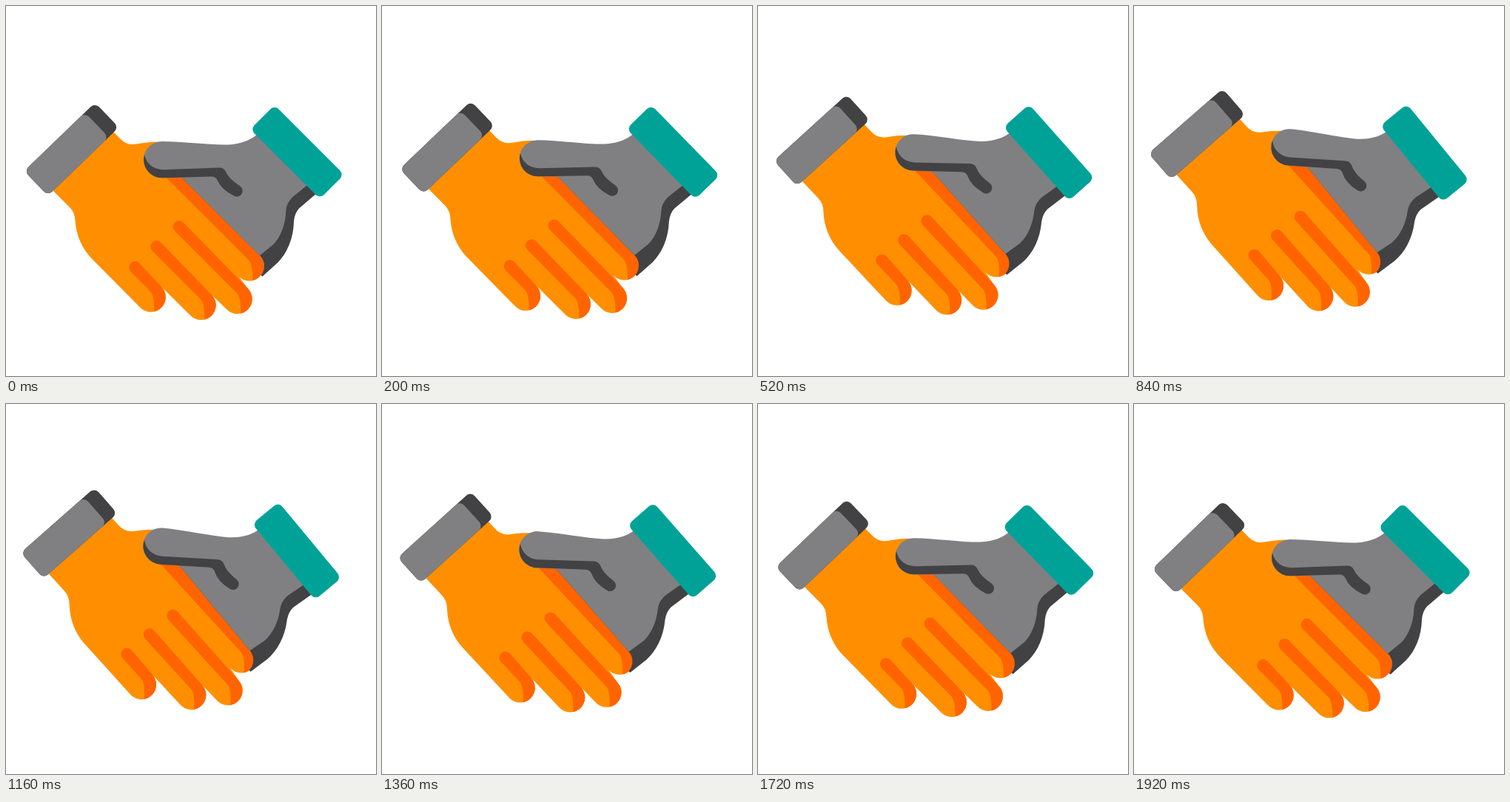
Recreate the animation shown at these times as an HTML page with a canvas. Size 500 by 500 pixels, loop 1960 ms.

```html
<!DOCTYPE html>
<html lang="en">
<head>
<meta charset="utf-8">
<title>Handshake</title>
<style>
  html, body { margin: 0; width: 100%; height: 100%; overflow: hidden; background: #fff; }
  canvas { display: block; width: 100vw; height: 100vh; object-fit: contain; }
</style>
</head>
<body>
<canvas id="stage" width="500" height="500"></canvas>
<script>
const ctx = document.getElementById('stage').getContext('2d');

const ORANGE = '#ff8f00', EMBER = '#ff6400';
const GRAY = '#808082', DARK = '#424143', TEAL = '#00a298';
const STEP = 40, FRAMES = 49, HALF = 24;
const R = 20, D = R * Math.SQRT1_2, Q = Math.PI / 4;

// Fingertip centres and the x where each shaded groove begins
const fingers = [
  { x: 195.8, y: 393.5, groove: 174.4 },
  { x: 263.7, y: 404.3, groove: 203.5 },
  { x: 312.7, y: 396, groove: 233.8 },
  { x: 328.8, y: 351.4, groove: 212 }
];

function makePalm() {
  const p = new Path2D('M135 160 L100 200 L64 250 L86 272 Q93 279 93.5 290 C95 312 104 329 116 341.5');
  for (const f of fingers) p.arc(f.x, f.y, R, 3 * Q, -Q, true);
  p.lineTo(215, 209.3);
  p.lineTo(205, 183.5);
  p.quadraticCurveTo(190, 184, 178, 186.3);
  p.quadraticCurveTo(164, 189.5, 155, 180);
  p.closePath();
  return p;
}

function makeGroove({ x, y, groove }) {
  const p = new Path2D();
  p.arc(groove, groove - x + y - 18.8, 8.2, -Q, 3 * Q, true);
  p.lineTo(x - 1, y - 8.2);
  p.quadraticCurveTo(x + 5, y - 2.2, x + 4.5, y + 19.5);
  p.arc(x, y, R, 1.344, -Q, true);
  p.closePath();
  return p;
}

function makeBody() {
  const f = fingers[3];
  const p = new Path2D();
  p.moveTo(228, 228 - f.x + f.y - 2 * D);
  p.arc(f.x, f.y, R, -Q, 0.66);
  p.lineTo(346.5, 365.5);
  p.lineTo(367.5, 346.5);
  p.bezierCurveTo(379.5, 334, 388.5, 315, 389, 291);
  p.quadraticCurveTo(390, 280, 396, 273.5);
  p.lineTo(420, 253);
  p.lineTo(390, 200);
  p.closePath();
  return p;
}

const palm = makePalm();
const grooves = fingers.map(makeGroove);
const underlap = new Path2D('M215 209.3 L232 212 L250 235 L278 272.3 Z');
const body = makeBody();
const lightBody = new Path2D('M343 170 Q328 186 300 187.5 C275 188 240 183.1 210.5 183.1 ' +
  'A24.6 24.6 0 0 0 210.5 232.3 L238 232.3 L342.94 337.26 L361.5 322 ' +
  'C372 311.5 378 293 378.3 277 Q379 266 387.5 258 L409 240.5 L390 200 Z');
const crease = new Path2D('M187 201 C190 214 200 221.2 213 221.2 L287 218.5 Q294 218 296.8 223.5 ' +
  'Q301 233.5 315.8 243 A7.6 7.6 0 0 1 308 256.5 Q291 248 286 236 Q283.5 230 277 230.4 ' +
  'L212 232.3 A24.6 24.6 0 0 1 187 201 Z');

function fill(color, path) {
  ctx.fillStyle = color;
  ctx.fill(path);
}

function cuff(cx, cy, deg, parts) {
  ctx.save();
  ctx.translate(cx, cy);
  ctx.rotate(deg * Math.PI / 180);
  for (const [color, length] of parts) {
    const p = new Path2D();
    p.roundRect(-66.5, -23.2, length, 46.4, 8);
    fill(color, p);
  }
  ctx.restore();
}

function turned(px, py, deg, paint) {
  ctx.save();
  ctx.translate(px, py);
  ctx.rotate(deg * Math.PI / 180);
  ctx.translate(-px, -py);
  paint();
  ctx.restore();
}

function leftHand() {
  fill(ORANGE, palm);
  fill(EMBER, underlap);
  for (const g of grooves) fill(EMBER, g);
  cuff(88.5, 193.5, -44, [[DARK, 133], [GRAY, 114]]);
}

function rightHand() {
  fill(DARK, body);
  fill(GRAY, lightBody);
  fill(DARK, crease);
  cuff(393.5, 197.2, 45, [[TEAL, 133]]);
}

function draw(time) {
  const frame = Math.floor(time / STEP) % FRAMES;
  const t = 1 - Math.abs(frame - HALF) / HALF;
  const lift = t * t * (3 - 2 * t);
  ctx.fillStyle = '#fff';
  ctx.fillRect(0, 0, 500, 500);
  turned(497, 113, 3 * lift, leftHand);
  turned(378.5, 192, 6 * lift, rightHand);
}

function loop() {
  draw(performance.now());
  requestAnimationFrame(loop);
}
loop();
</script>
</body>
</html>
```
